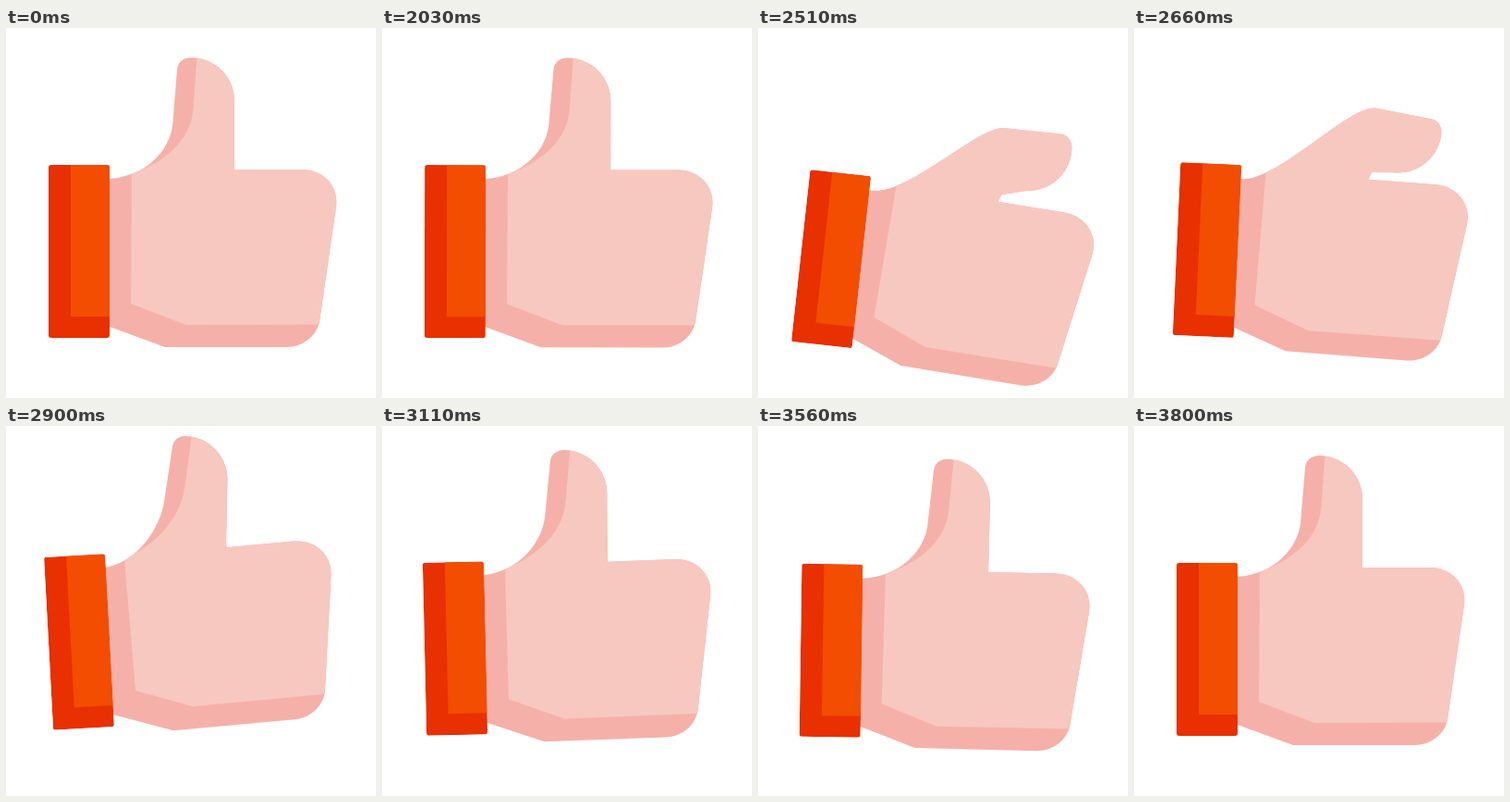
Animation of 400x400 px, one loop 3.83 s. Source, as an HTML page:

```html
<!DOCTYPE html>
<html lang="en">
<head>
<meta charset="utf-8">
<title>Thumbs up</title>
<style>
  html, body { margin: 0; width: 100%; height: 100%; overflow: hidden; background: #fff; }
  svg { display: block; width: 100%; height: 100%; }
</style>
</head>
<body>
<svg viewBox="0 0 400 400">
  <defs>
    <clipPath id="handClip"><path id="clipOutline"/></clipPath>
    <clipPath id="cuffClip"><rect x="46" y="148" width="66" height="187" rx="3"/></clipPath>
  </defs>
  <g id="hand">
    <path id="outline" fill="#f5b1a9"/>
    <path id="light" fill="#f7c8c0" clip-path="url(#handClip)"/>
  </g>
  <g id="cuff" clip-path="url(#cuffClip)">
    <rect x="46" y="148" width="66" height="187" fill="#e83000"/>
    <rect x="70" y="148" width="42" height="164" fill="#f24d00"/>
  </g>
</svg>
<script>
const LOOP = 3830, START = 2030, STEP = 30;
const SWING_START = 2000, SWING_END = 3720;
const CUFF = { x: 79, y: 241.5 };
const WRIST = 33; // distance from cuff centre to the hand's pivot
const KNUCKLE = { x: 229, y: 124 };

const el = id => document.getElementById(id);
const radians = deg => deg * Math.PI / 180;

// Eases from rest through each [time, value] turning point and back to rest
function swing(...turns) {
  const points = [[SWING_START, 0], ...turns, [SWING_END, 0]];
  return t => {
    const i = points.findIndex(([time]) => time > t);
    if (i < 1) return 0;
    const [[t0, v0], [t1, v1]] = [points[i - 1], points[i]];
    return v0 + (v1 - v0) * (1 - Math.cos(Math.PI * (t - t0) / (t1 - t0))) / 2;
  };
}

const cuffAngle = swing([2420, 7], [2950, -3.3], [3340, 2.2]);
const handLag = swing([2540, 3], [2920, -2.2], [3340, 1.3]);
const bounce = swing([2400, 11], [2840, -8.5], [3310, 3.9]);
const thumbFold = swing([2140, 0], [2610, 92], [2650, 92], [2950, 3]);

// Turns thumb points about the knuckle, with a slight sag halfway through
function thumbTurner(fold) {
  const a = radians(fold), cos = Math.cos(a), sin = Math.sin(a);
  const sag = Math.sin(2 * a) ** 2;
  return (x, y) => {
    const dx = x - KNUCKLE.x, dy = y - KNUCKLE.y;
    return [KNUCKLE.x + dx * cos - dy * sin + 8 * sag,
            KNUCKLE.y + dx * sin + dy * cos + 6.5 * sag].map(v => v.toFixed(2)).join(" ");
  };
}

function outlinePath(fold) {
  const p = thumbTurner(fold);
  const crease = 247 + 3 * Math.sin(radians(fold));
  return `M100 163.5L112 163C152 160 ${p(177, 132)} ${p(180, 105)}L${p(185, 45)}` +
    `C${p(185.5, 37)} ${p(192, 32)} ${p(200, 32)}C${p(226, 32)} ${p(247, 53)} ${p(247, 79)}` +
    `L${crease} 145L247 153H320C343 153 360 171 357 193L339 317` +
    `C336 333 321 345 303 345H172L112 323L100 318.6Z`;
}

// The lit side slides over the shaded edge as the thumb folds
function lightPath(fold) {
  const p = thumbTurner(fold);
  const bend = Math.sin(radians(fold));
  const slide = 50 * bend ** 2, lift = 12 * bend;
  return `M${p(206.5 - slide, 30)}L${p(202.5 - slide, 87)}` +
    `C${p(200 - slide, 125)} 165 ${148 - lift} 136 ${157 - lift}` +
    `L135 298L195 321L339 320.5H400V20Z`;
}

function draw(time) {
  const t = time < START ? 0 : START + Math.floor((time - START) / STEP) * STEP;
  const cuff = cuffAngle(t), dy = bounce(t), fold = thumbFold(t);
  const x = CUFF.x + WRIST * Math.cos(radians(cuff));
  const y = CUFF.y + dy + WRIST * Math.sin(radians(cuff));

  el("cuff").setAttribute("transform",
    `translate(0 ${dy}) rotate(${cuff} ${CUFF.x} ${CUFF.y})`);
  el("hand").setAttribute("transform",
    `translate(${x} ${y}) rotate(${cuff + handLag(t)}) translate(${-CUFF.x - WRIST} ${-CUFF.y})`);

  const outline = outlinePath(fold);
  el("outline").setAttribute("d", outline);
  el("clipOutline").setAttribute("d", outline);
  el("light").setAttribute("d", lightPath(fold));
}

const begin = performance.now();
function tick() {
  draw((performance.now() - begin) % LOOP);
  requestAnimationFrame(tick);
}
tick();
</script>
</body>
</html>
```
